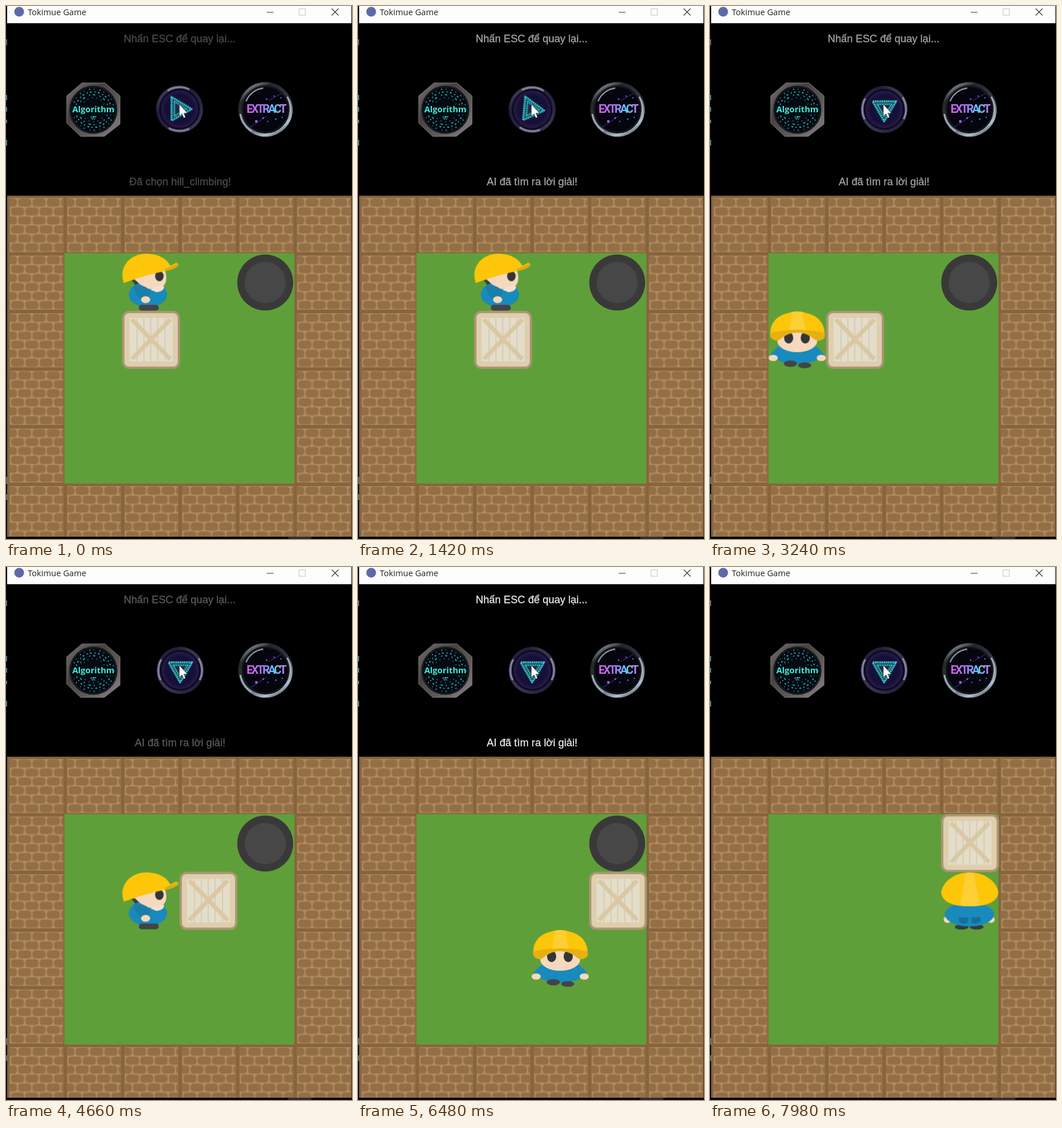
Animation, 604 px wide and 928 px high, one loop 8 s. Source, as an HTML page:

```html
<!DOCTYPE html>
<html lang="vi">
<head>
<meta charset="utf-8">
<title>Tokimue Game</title>
<style>
  html, body { margin: 0; width: 100%; height: 100%; overflow: hidden; background: #000; }
  svg { display: block; width: 604px; height: 928px; }

  .message { font: 18.3px "Liberation Sans", Arial, sans-serif; fill: #fff; stroke: #fff; stroke-width: .3; text-anchor: middle; }
  .title { font: 14.6px "Open Sans", sans-serif; fill: #222; }
  .algorithm { font: bold 14.7px "Open Sans", sans-serif; fill: #3cecdc; text-anchor: middle; }
  .extract { font: bold 20px Roboto, sans-serif; letter-spacing: -2.9px; fill: url(#neon); }

  .pulse { animation: pulse 8s linear infinite; }
  .spin { animation: spin 8s linear infinite; }
  .player, .box, .chosen, .solved, .side, .front, .back { animation: 8s step-end infinite; }
  .player { animation-name: walk; }
  .box { animation-name: push; }
  .chosen { animation-name: chosen; }
  .solved { animation-name: solved; }
  .side { animation-name: side; }
  .front { animation-name: front; }
  .back { animation-name: back; }

  @keyframes pulse {
    0% { opacity: .29 }
    11.5% { opacity: 1 }
    30% { opacity: 0 }
    46.2% { opacity: 1 }
    64.88% { opacity: 0 }
    82.31% { opacity: 1 }
    99.75%, 100% { opacity: 0 }
  }
  @keyframes spin {
    0%, 17.2% { transform: translate(303px, 179.5px) }
    17.6% { transform: translate(304px, 180px) rotate(4deg) }
    28%, 100% { transform: translate(304px, 180px) rotate(90deg) }
  }
  @keyframes walk {
    0% { transform: translate(202.7px, 430.3px) }
    28.625% { transform: translate(202.6px, 430.3px) scaleX(-1) }
    39.5% { transform: translate(102.3px, 530.7px) }
    50.375% { transform: translate(202.7px, 530.7px) }
    61.25% { transform: translate(303px, 530.7px) }
    72.125% { transform: translate(303px, 631px) }
    83% { transform: translate(403.4px, 631px) }
    93.875%, 100% { transform: translate(403.4px, 530.7px) }
  }
  @keyframes push {
    0% { transform: translate(202.7px, 530.7px) }
    50.375% { transform: translate(303px, 530.7px) }
    61.25% { transform: translate(403.4px, 530.7px) }
    93.875%, 100% { transform: translate(403.4px, 430.3px) }
  }
  @keyframes chosen { 0% { opacity: 1 } 17.5%, 100% { opacity: 0 } }
  @keyframes solved { 0% { opacity: 0 } 17.5%, 100% { opacity: 1 } }
  @keyframes side {
    0%, 50.375%, 83% { opacity: 1 }
    39.5%, 72.125%, 93.875%, 100% { opacity: 0 }
  }
  @keyframes front {
    0%, 50.375%, 83%, 100% { opacity: 0 }
    39.5%, 72.125% { opacity: 1 }
  }
  @keyframes back { 0% { opacity: 0 } 93.875%, 100% { opacity: 1 } }
</style>
</head>
<body>
<svg viewBox="0 0 604 928" xmlns="http://www.w3.org/2000/svg">
  <defs>
    <pattern id="bricks" x="-7" y="4" width="25" height="31.2" patternUnits="userSpaceOnUse">
      <g fill="#946e45">
        <rect x="1.2" y="1" width="22.8" height="13.8" rx="5"/>
        <rect x="-11.3" y="16.6" width="22.8" height="13.8" rx="5"/>
        <rect x="13.7" y="16.6" width="22.8" height="13.8" rx="5"/>
      </g>
    </pattern>
    <pattern id="wall" x="2" y="330.3" width="100.33" height="100.33" patternUnits="userSpaceOnUse">
      <rect width="101" height="101" fill="#87643d"/>
      <rect x="4.5" y="4" width="93.5" height="94" fill="#b08b5f"/>
      <rect x="4.5" y="4" width="93.5" height="94" fill="url(#bricks)"/>
    </pattern>
    <linearGradient id="steel" x1="0" y1="0" x2="1" y2="1">
      <stop offset="0" stop-color="#777270"/>
      <stop offset=".35" stop-color="#47413f"/>
      <stop offset=".65" stop-color="#5f595a"/>
      <stop offset="1" stop-color="#898486"/>
    </linearGradient>
    <linearGradient id="chrome" x1=".2" y1="0" x2=".8" y2="1">
      <stop offset="0" stop-color="#a0a6ad"/>
      <stop offset=".2" stop-color="#23272d"/>
      <stop offset=".55" stop-color="#343a43"/>
      <stop offset=".85" stop-color="#b4bfca"/>
      <stop offset="1" stop-color="#343944"/>
    </linearGradient>
    <linearGradient id="violet" x1="0" y1="0" x2="1" y2="1">
      <stop offset="0" stop-color="#57566b"/>
      <stop offset=".3" stop-color="#211d38"/>
      <stop offset=".7" stop-color="#2b2445"/>
      <stop offset="1" stop-color="#4a4964"/>
    </linearGradient>
    <radialGradient id="depth">
      <stop offset="0" stop-color="#141b45"/>
      <stop offset=".7" stop-color="#150f34"/>
      <stop offset="1" stop-color="#2a1c50"/>
    </radialGradient>
    <linearGradient id="neon">
      <stop offset="0" stop-color="#dc5cf4"/>
      <stop offset=".4" stop-color="#a871f2"/>
      <stop offset=".7" stop-color="#60c8f4"/>
      <stop offset="1" stop-color="#d070f0"/>
    </linearGradient>
  </defs>

  <!-- desktop slivers -->
  <rect width="604" height="928" fill="#08060e"/>
  <path d="M0 58h2v10h-2zM0 820h2v12h-2zM0 850h2v10h-2z" fill="#666"/>
  <path d="M0 155h2v9h-2zM0 176h2v8h-2zM0 198h2v6h-2zM0 233h2v10h-2z" fill="#3987a8"/>
  <rect x="493" y="924" width="40" height="4" fill="#302d36"/>

  <!-- window -->
  <rect x="2" width="601" height="30" fill="#fdfdfd"/>
  <circle cx="23" cy="10" r="8.5" fill="#5d6aa5"/>
  <text class="title" x="38" y="16">Tokimue Game</text>
  <g fill="none" stroke-width="1.2">
    <path d="M455 11h12M568.5 4.5l12 12M580.5 4.5l-12 12" stroke="#333"/>
    <rect x="511.5" y="5" width="11" height="11" stroke="#ccc"/>
  </g>
  <rect x="2" y="30" width="601" height="300" fill="#000"/>

  <g class="pulse">
    <text class="message" x="303" y="63">Nhấn ESC để quay lại...</text>
    <text class="message chosen" x="304" y="312">Đã chọn hill_climbing!</text>
    <text class="message solved" x="304" y="312">AI đã tìm ra lời giải!</text>
  </g>

  <!-- algorithm button -->
  <g transform="translate(152.5 180.5)">
    <path d="M-20-46.5H20L46.5-24V25L19 46.5H-22L-46.5 23V-24Z" fill="url(#steel)" stroke="#857f7b"/>
    <circle r="40.5" fill="#050a11" stroke="#17191d" stroke-width="3"/>
    <g fill="none" stroke="#25a6ac" stroke-width="2">
      <circle r="36" stroke-dasharray="2 6 1 9"/>
      <circle r="31" stroke-dasharray="3 5 2 4"/>
      <circle r="26" stroke-dasharray="2 5 4 8"/>
      <circle r="21" stroke-dasharray="1 7"/>
    </g>
    <rect x="-36" y="-8" width="72" height="17" fill="#050a11"/>
    <text class="algorithm" y="4">Algorithm</text>
    <path d="M-5 13h9M-3 16h6M-1 12h6" stroke="#35d8d0" stroke-width="1.6" stroke-dasharray="3 1"/>
  </g>

  <!-- play button -->
  <g class="spin">
    <circle r="41" fill="url(#violet)"/>
    <path d="M-21-32A38 38 0 0 1 17-34M-19 33A38 38 0 0 0 17 34" fill="none" stroke="#7f839b" stroke-width="3.5"/>
    <circle r="34" fill="url(#depth)" stroke="#0d0a1d" stroke-width="3"/>
    <g fill="none" stroke="#35b9be" stroke-linejoin="round">
      <path d="M-14-21V20L21 0Z" fill="#174159" stroke-width="3.6" stroke-dasharray="3 .8"/>
      <path d="M-9-13V12L12 0Z" fill="#1a2c50" stroke-width="3" stroke-dasharray="2 1"/>
    </g>
  </g>

  <!-- extract button -->
  <g transform="translate(453 180)">
    <circle r="47.5" fill="url(#chrome)"/>
    <circle r="40.5" fill="#04050d" stroke="#14171f" stroke-width="3"/>
    <path d="M-34-14A37 37 0 0 1-4-37" fill="none" stroke="#8a929c" stroke-width="2.5"/>
    <path d="M-44 8A45 45 0 0 0-24 38M38-22A44 44 0 0 1 42 12" fill="none" stroke="#a3abb5" stroke-width="3"/>
    <path d="M-26 30L2 12M5-15L28-28" stroke="#3c2379" stroke-width="1.2"/>
    <g fill="#5a62d8">
      <circle cx="2" cy="-18" r="1.5"/><circle cx="15" cy="-23" r="1.3"/>
      <circle cx="27" cy="-20" r="1.3"/><circle cx="18" cy="17" r="1.5"/>
      <circle cx="4" cy="21" r="1.2"/><circle cx="29" cy="14" r="1.2"/>
      <circle cx="-16" cy="21" r="2.4" fill="#b44cf0"/>
      <circle cx="-4" cy="15" r="1.5" fill="#b44cf0"/>
    </g>
    <text class="extract" x="-33" y="5.5">EXTRACT</text>
  </g>

  <path d="M302.5 171V192L307.2 187.8L310.3 195L313.5 193.6L310.4 186.6H316.8Z" fill="#fff" stroke="#222" stroke-width=".7"/>

  <!-- board -->
  <rect x="2" y="330.3" width="601.5" height="593.7" fill="url(#wall)"/>
  <rect x="102" y="430.3" width="401.5" height="401.2" fill="#5f9f39"/>
  <g transform="translate(452.5 481.5)">
    <circle r="48.8" fill="#393939"/>
    <circle r="36" fill="#474747"/>
  </g>

  <g class="box">
    <rect x="2" y="2" width="97" height="97" rx="10" fill="#dfcfae" stroke="#ab9674" stroke-width="4"/>
    <rect x="13" y="11" width="75" height="77" rx="2" fill="#e4ddc9"/>
    <path d="M26 11V88M38 11V88M50 11V88M62 11V88M75 11V88" stroke="#d3c9b0" stroke-width="1.6"/>
    <path d="M17 15L84 84M84 15L17 84" stroke="#dac8a4" stroke-width="7.5"/>
    <rect x="9" y="8" width="83" height="84" rx="4" fill="none" stroke="#dfcfae" stroke-width="8"/>
  </g>

  <g class="player">
    <g class="side">
      <path d="M15 45L31 66L38 52Z" fill="#3d3e40"/>
      <ellipse cx="45" cy="72" rx="33.5" ry="22" fill="#188abd"/>
      <path d="M21 44Q45 24 74 29Q79 40 76 51Q72 61 57 64Q35 62 21 44Z" fill="#f6d8bc"/>
      <path d="M50 64Q64 54 73 58Q74 66 60 68Z" fill="#f6e0cd"/>
      <ellipse cx="65" cy="40" rx="7.5" ry="9" fill="#353536"/>
      <path d="M20 57Q39 52 50 68L44 84Q25 82 20 57Z" fill="#1b7eaa"/>
      <ellipse cx="41" cy="81" rx="8" ry="6" fill="#f6d8bc"/>
      <rect x="29" y="90" width="35" height="10" rx="5" fill="#424446"/>
      <path d="M3 52C-7 24 14 1 42 1C64 1 78 10 84 22L94 17Q101 18 97 23Q89 29 76 31Q40 38 3 52Z" fill="#fdc608"/>
      <path d="M76 27Q88 22 97 18Q101 20 95 24Q86 30 74 30Z" fill="#dfa914"/>
    </g>
    <g class="front">
      <ellipse cx="50" cy="74" rx="42" ry="19" fill="#188abd"/>
      <path d="M15 65Q2 72 3 82H20ZM85 65Q98 72 97 82H80Z" fill="#188abd"/>
      <g fill="#f6d8bc">
        <ellipse cx="8" cy="82" rx="8" ry="5.5"/>
        <ellipse cx="92" cy="82" rx="8" ry="5.5"/>
        <ellipse cx="50" cy="52" rx="35" ry="20"/>
      </g>
      <g fill="#353536">
        <ellipse cx="35" cy="47" rx="8" ry="10"/>
        <ellipse cx="64" cy="47" rx="8" ry="10"/>
      </g>
      <ellipse cx="38" cy="92" rx="11.5" ry="5.5" fill="#424446"/>
      <ellipse cx="63" cy="95" rx="11.5" ry="5" fill="#424446"/>
      <path d="M3 45Q-1 14 33 4Q50-2 67 4Q101 14 98 46Q92 54 82 51Q66 37 50 38Q34 37 18 51Q8 54 3 45Z" fill="#e6b012"/>
      <path d="M4 38Q5 10 34 4Q50-2 66 4Q95 10 97 38Q50 28 4 38Z" fill="#fdc608"/>
      <path d="M36 34L41 3Q50 0 59 3L65 34Q50 31 36 34Z" fill="#fdcf35"/>
    </g>
    <g class="back">
      <ellipse cx="36" cy="96" rx="12" ry="4.5" fill="#353a43"/>
      <ellipse cx="62" cy="96" rx="12" ry="4.5" fill="#353a43"/>
      <ellipse cx="11" cy="83" rx="6.5" ry="6" fill="#f6d8bc"/>
      <ellipse cx="87" cy="83" rx="6.5" ry="6" fill="#f6d8bc"/>
      <ellipse cx="49.5" cy="74" rx="43" ry="21" fill="#188abd"/>
      <path d="M31 79H47V88Q39 93 31 87ZM53 79H69V87Q61 93 53 88Z" fill="#176f98"/>
      <path d="M0 37C2 17 24 1 50 1S98 17 100 37C97 53 80 60 50 60S3 53 0 37Z" fill="#fdc608"/>
      <path d="M33 58L43 3Q50 0 57 3L68 58Q50 62 33 58Z" fill="#fdcf35"/>
    </g>
  </g>
</svg>
</body>
</html>
```
